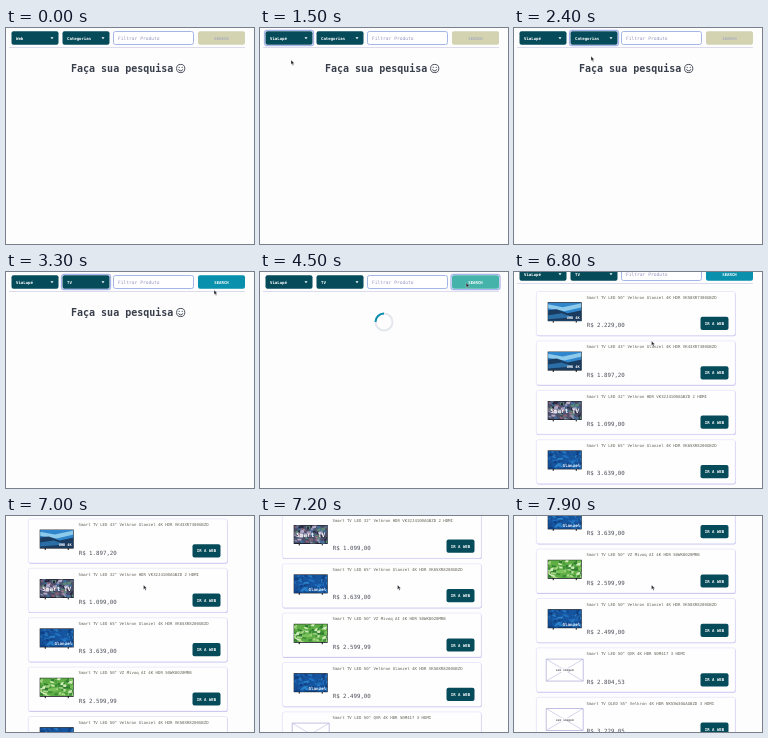
An HTML page with a canvas for the animation above (8 s loop, 248 px wide and 216 px high).

```html
<!DOCTYPE html>
<html lang="pt-BR">
<head>
<meta charset="utf-8">
<title>Pesquisa de produtos</title>
<style>
  html, body { margin: 0; width: 100%; height: 100%; overflow: hidden; background: #fdfdfe; }
  canvas { display: block; width: 248px; height: 216px; }
</style>
</head>
<body>
<canvas id="stage"></canvas>
<script>
const W = 248, H = 216, LOOP = 8000;
const canvas = document.getElementById('stage');
const ctx = canvas.getContext('2d');
const ratio = window.devicePixelRatio || 1;
canvas.width = W * ratio;
canvas.height = H * ratio;

const MONO = '"DejaVu Sans Mono", "Liberation Mono", monospace';
const PAGE = '#fdfdfe', DARK = '#064b5a', CYAN = '#0990ac', TEAL = '#46b3aa';
const LILAC = '#e0ddf6', SHADOW = '#c3bdf0', RING = '#a9b4ea';
const CARD_TOP = 27.5, CARD_STEP = 49.4, CARD_H = 44;

const items = [
  ['Smart TV LED 50" Velkron Glanzel 4K HDR VK50XR7300GBZD', '2.229,00', 'coast'],
  ['Smart TV LED 43" Velkron Glanzel 4K HDR VK43XR7300GBZD', '1.897,20', 'coast'],
  ['Smart TV LED 32" Velkron HDR VK32J4100AGBZD 2 HDMI', '1.099,00', 'mixed'],
  ['Smart TV LED 65" Velkron Glanzel 4K HDR VK65XR8200GBZD', '3.639,00', 'deep'],
  ['Smart TV LED 50" VZ Mivoq AI 4K HDR 50WK8020MRB', '2.599,99', 'green'],
  ['Smart TV LED 50" Velkron Glanzel 4K HDR VK50XR8200GBZD', '2.499,00', 'deep'],
  ['Smart TV LED 50" QVR 4K HDR 50M417 3 HDMI', '2.804,53', ''],
  ['Smart TV QLED 55" Velkron 4K HDR NK55W30AAGBZD 3 HDMI', '3.229,05', '']
];

// [time, x, y] of the pointer tip
const pointerPath = [
  [600, 60, 40], [900, 30, 10], [1100, 30, 11], [1400, 31, 32], [1500, 31, 32],
  [1900, 80, 10], [2100, 80, 11], [2500, 76, 34], [2700, 76, 34], [3200, 208, 18],
  [3300, 208, 18], [3600, 208, 10], [4200, 208, 10], [5000, 203, 12], [5700, 194, 15],
  [6200, 194, 15], [6700, 137.5, 69]
];
const scrollPath = [
  [6700, 0], [6800, 8], [6900, 36], [7000, 74], [7100, 104], [7200, 128],
  [7400, 150], [7600, 172], [7900, 192]
];

function sample(path, t, k) {
  if (t <= path[0][0]) return path[0][k];
  for (let i = 1; i < path.length; i++) {
    const a = path[i - 1], b = path[i];
    if (t <= b[0]) return a[k] + (b[k] - a[k]) * (t - a[0]) / (b[0] - a[0]);
  }
  return path[path.length - 1][k];
}

function seeded(seed) {
  return () => (seed = seed * 16807 % 2147483647) / 2147483647;
}

function text(str, x, y, size, color, bold, align = 'left') {
  ctx.font = `${bold ? 'bold ' : ''}${size}px ${MONO}`;
  ctx.fillStyle = color;
  ctx.textAlign = align;
  ctx.textBaseline = 'alphabetic';
  ctx.fillText(str, x, y);
}

function box(x, y, w, h, r, fill, stroke, line = 0.7) {
  ctx.beginPath();
  ctx.roundRect(x, y, w, h, r);
  if (fill) { ctx.fillStyle = fill; ctx.fill(); }
  if (stroke) { ctx.strokeStyle = stroke; ctx.lineWidth = line; ctx.stroke(); }
}

function rect(x, y, w, h, fill) {
  ctx.fillStyle = fill;
  ctx.fillRect(x, y, w, h);
}

function poly(points, fill) {
  ctx.beginPath();
  points.forEach(([x, y]) => ctx.lineTo(x, y));
  ctx.closePath();
  ctx.fillStyle = fill;
  ctx.fill();
}

function ring(x, y, w, h) {
  box(x - 1, y - 1, w + 2, h + 2, 2.6, null, RING, 1.3);
}

function select(x, label, focused) {
  if (focused) ring(x, 3.3, 47, 13.4);
  box(x, 3.3, 47, 13.4, 2, DARK);
  text(label, x + 4.5, 11.6, 4, '#fff', true);
  poly([[x + 39, 9.2], [x + 42, 9.2], [x + 40.5, 11.2]], '#fff');
}

function header(t) {
  const enabled = t >= 2600;
  const hover = t >= 3400 && t < 6300;
  select(5.5, t < 1300 ? 'Web' : 'ViaLupé', t >= 900 && t < 1900);
  select(56.5, t < 2500 ? 'Categorias' : 'TV', t >= 1900 && t < 3600);
  box(107.5, 3.5, 80, 13, 2, '#fff', '#9aaee2', 0.9);
  text('Filtrar Produto', 112, 11.8, 4.6, '#9494c2');
  if (t >= 3600 && t < 5300) ring(192, 3.3, 47, 13.4);
  box(192, 3.3, 47, 13.4, 2, !enabled ? '#d3d3b2' : hover ? TEAL : CYAN);
  text('SEARCH', 215.5, 11.6, 4, enabled ? '#fff' : '#a9acbb', true, 'center');
  rect(3, 19, 236, 0.7, '#cdcde4');
}

function heading() {
  text('Faça sua pesquisa', 65, 44.2, 10, '#383e4a', true);
  ctx.strokeStyle = ctx.fillStyle = '#383e4a';
  ctx.lineWidth = 0.9;
  ctx.beginPath();
  ctx.arc(174.7, 40.5, 4.1, 0, 7);
  ctx.stroke();
  ctx.beginPath();
  ctx.arc(174.7, 40.7, 2.2, 0.25, Math.PI - 0.25);
  ctx.stroke();
  for (const x of [173.2, 176.2]) {
    ctx.beginPath();
    ctx.arc(x, 39.3, 0.6, 0, 7);
    ctx.fill();
  }
}

function spinner(t) {
  const a = t / 1000 * Math.PI * 2;
  ctx.lineWidth = 2;
  ctx.strokeStyle = '#e4e6ee';
  ctx.beginPath();
  ctx.arc(124, 50, 8.5, 0, 7);
  ctx.stroke();
  ctx.strokeStyle = CYAN;
  ctx.beginPath();
  ctx.arc(124, 50, 8.5, a, a + Math.PI / 2);
  ctx.stroke();
}

function patches(x, y, base, tones, count, seed) {
  const rnd = seeded(seed);
  rect(x, y, 34, 19, base);
  for (let i = 0; i < count; i++) {
    const px = x + rnd() * 33, py = y + rnd() * 18;
    const w = 1.5 + rnd() * 3, slant = rnd() * 3 - 1.5;
    poly([[px, py], [px + w, py + slant], [px + w + slant, py + 2.4], [px + slant, py + 2]],
      tones[i % tones.length]);
  }
}

const screens = {
  coast(x, y) {
    rect(x, y, 34, 19, '#2f86cc');
    poly([[x, y + 2], [x + 15, y + 5], [x + 34, y + 1], [x + 34, y + 5], [x + 17, y + 9], [x, y + 6]], '#8cc9ea');
    poly([[x, y + 8], [x + 9, y + 7], [x + 20, y + 11], [x + 34, y + 8], [x + 34, y + 19], [x, y + 19]], '#1a3a5e');
    poly([[x, y + 13], [x + 14, y + 11], [x + 26, y + 15], [x, y + 17]], '#2b6ea6');
    text('UHD 4K', x + 32, y + 16.5, 3.6, '#fff', true, 'right');
  },
  deep(x, y) {
    patches(x, y, '#15549f', ['#2170bf', '#0f3f80', '#2b82c9', '#174a8c'], 70, 41);
    text('Glanzel', x + 32.5, y + 16.5, 4.2, '#eef4fb', true, 'right');
  },
  green(x, y) {
    patches(x, y, '#5fae45', ['#a5d583', '#2f7a31', '#7cc35c', '#d3ecbd', '#3d8f36'], 80, 77);
  },
  mixed(x, y) {
    patches(x, y, '#4a4f6c', ['#8d93b4', '#3f6f9c', '#23263a', '#b3a9c4', '#5c8a78', '#8a5f74'], 90, 19);
    text('Smart TV', x + 17, y + 12, 6, '#fff', true, 'center');
  }
};

function tv(x, y, kind) {
  rect(x + 5, y + 18, 1.2, 2.4, '#333');
  rect(x + 28, y + 18, 1.2, 2.4, '#333');
  rect(x, y, 34, 19, '#15181f');
  ctx.save();
  ctx.beginPath();
  ctx.rect(x + 0.5, y + 0.5, 33, 17.8);
  ctx.clip();
  screens[kind](x, y);
  ctx.restore();
}

function emptyPicture(x, y) {
  box(x, y, 37, 22, 0.3, '#fff', '#aaa7d6', 0.7);
  ctx.lineWidth = 0.5;
  ctx.beginPath();
  ctx.moveTo(x, y);
  ctx.lineTo(x + 37, y + 22);
  ctx.moveTo(x + 37, y);
  ctx.lineTo(x, y + 22);
  ctx.stroke();
  rect(x + 8, y + 9.3, 21, 3.6, '#fff');
  text('sem imagem', x + 18.5, y + 12.2, 3, '#66656f', true, 'center');
}

function card([name, price, picture], y, loaded) {
  box(22.5, y + 0.8, 199.3, CARD_H, 2.2, SHADOW);
  box(22.3, y, 199, CARD_H, 2.2, '#fefeff', LILAC, 0.6);
  text(name, 72.5, y + 7.2, 4, '#646153');
  text('R$ ' + price, 72.7, y + 35.6, 5.75, '#4c4f58');
  box(186.5, y + 25.3, 28, 13.2, 2, DARK);
  text('IR A WEB', 200.5, y + 33.4, 4, '#fff', true, 'center');
  if (!loaded) return;
  if (picture) tv(33.7, y + 10.7, picture);
  else emptyPicture(32.2, y + 11.2);
}

function pointer(x, y) {
  const shape = [[0, 0], [0, 4.6], [1.1, 3.6], [1.9, 5.4], [2.7, 5], [1.9, 3.4], [3.3, 3.3]];
  poly(shape.map(([dx, dy]) => [x + dx, y + dy]), '#22242a');
  ctx.strokeStyle = '#fff';
  ctx.lineWidth = 0.3;
  ctx.stroke();
}

function draw(t) {
  ctx.setTransform(ratio, 0, 0, ratio, 0, 0);
  rect(0, 0, W, H, PAGE);
  const scroll = sample(scrollPath, t, 1);
  ctx.save();
  ctx.translate(0, -scroll);
  header(t);
  if (t < 3700) heading();
  else if (t < 5300) spinner(t);
  else items.forEach((item, i) => {
    const y = CARD_TOP + i * CARD_STEP;
    if (y < scroll + H && y + CARD_H + 2 > scroll) card(item, y, t >= 6300);
  });
  ctx.restore();
  if (t >= 600) pointer(sample(pointerPath, t, 1), sample(pointerPath, t, 2));
}

function frame() {
  const t = performance.now() % LOOP;
  draw(Math.floor(t / 100) * 100);
  requestAnimationFrame(frame);
}
frame();
</script>
</body>
</html>
```
